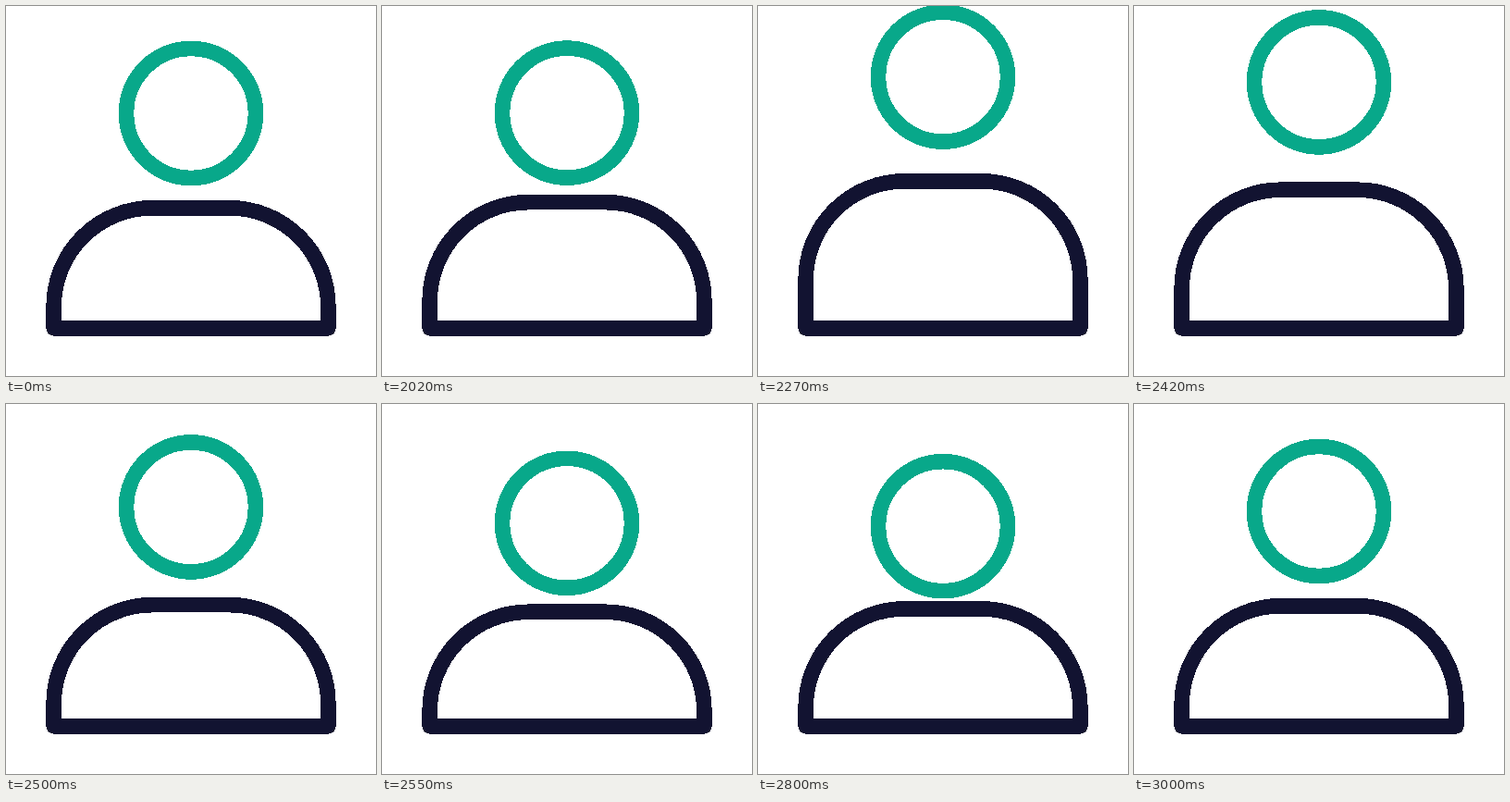
Write an HTML page that moves like this. It is 400x400 px and loops after 3020 ms.

```html
<!DOCTYPE html>
<html lang="en">
<head>
<meta charset="utf-8">
<title>Jumping avatar</title>
<style>
  html, body { margin: 0; width: 100%; height: 100%; overflow: hidden; background: #fff; }
  svg { display: block; width: 100%; height: 100%; }
</style>
</head>
<body>
<svg viewBox="0 0 400 400" fill="none" stroke-width="16.67" stroke-linejoin="round" shape-rendering="crispEdges">
  <circle id="head" cx="200" cy="116" r="70" stroke="#08a88a"/>
  <path id="body" stroke="#121331"/>
</svg>
<script>
  const LOOP = 3020, JUMP_START = 2000, FRAME = 25;
  const HEAD_Y = 116, BODY_Y = 218.33;
  const LEFT = 51.67, RIGHT = 348.33, BOTTOM = 348.33, RADIUS = 106.67;

  const easeInOut = p => p * p * (3 - 2 * p);
  const easeOut = p => Math.sin(p * Math.PI / 2);

  // [ms since the jump began, vertical offset, easing towards this key]
  const headKeys = [[15, 0], [188, -40], [390, -38.5], [580, 16.5], [750, 18], [1000, 0]];
  const bodyKeys = [[0, 0], [185, -29.5, easeOut], [357, -28.5], [565, 7], [1000, 0]];

  const head = document.getElementById('head');
  const body = document.getElementById('body');

  function offsetAt(keys, time) {
    if (time <= keys[0][0]) return keys[0][1];
    for (let i = 1; i < keys.length; i++) {
      const [t0, y0] = keys[i - 1], [t1, y1, ease = easeInOut] = keys[i];
      if (time < t1) return y0 + (y1 - y0) * ease((time - t0) / (t1 - t0));
    }
    return keys[keys.length - 1][1];
  }

  function bodyPath(top) {
    const arc = `A${RADIUS} ${RADIUS} 0 0 1`, shoulder = top + RADIUS;
    return `M${LEFT} ${BOTTOM}V${shoulder}${arc} ${LEFT + RADIUS} ${top}` +
      `H${RIGHT - RADIUS}${arc} ${RIGHT} ${shoulder}V${BOTTOM}Z`;
  }

  function draw(ms) {
    // 40 frames per second, with frame starts rounded down to 10 ms
    const frame = Math.floor((Math.floor(ms / 10) + 0.5) * 10 / FRAME);
    const time = frame * FRAME - JUMP_START;
    head.setAttribute('cy', HEAD_Y + offsetAt(headKeys, time));
    body.setAttribute('d', bodyPath(BODY_Y + offsetAt(bodyKeys, time)));
  }

  function tick() {
    draw(performance.now() % LOOP);
    requestAnimationFrame(tick);
  }
  tick();
</script>
</body>
</html>
```
